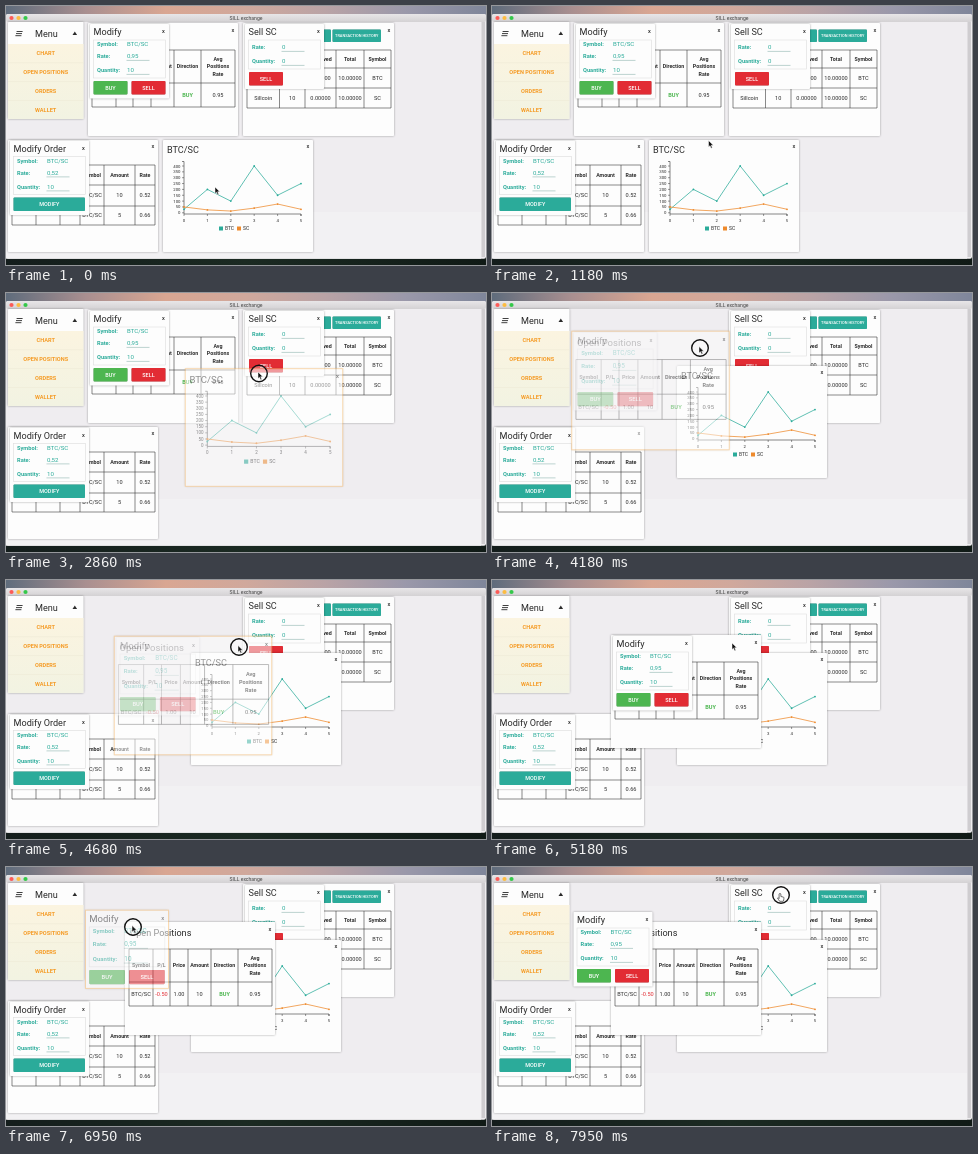
An HTML page that plays this animation: 480 px wide and 259 px high, repeating every 8 s.

```html
<!DOCTYPE html>
<html lang="en">
<head>
<meta charset="utf-8">
<title>Exchange dashboard</title>
<style>
html, body { margin: 0; width: 100%; height: 100%; overflow: hidden; background: #eee; }
svg { display: block; width: 100vw; height: 100vh; font-family: Roboto, "Open Sans", sans-serif; }
.card { fill: #fdfdfd; filter: drop-shadow(0 .7px 1px rgba(0,0,0,.35)); }
.btn { filter: drop-shadow(0 .6px .6px rgba(0,0,0,.35)); }
.grid { fill: none; stroke: #3c3c3c; stroke-width: .6; }
.edge { fill: none; stroke: #f7b765; stroke-width: .9; visibility: hidden; }
.drag > .edge { visibility: visible; }
.drag, .drag .nest { opacity: .52; }
</style>
</head>
<body>
<svg id="stage" viewBox="0 0 480 259"></svg>
<script>
const TEAL = '#2bab9a', ORANGE = '#f59a23', RED = '#e22c34', GREEN = '#4db650', INK = '#2b2b2b';
const stage = document.getElementById('stage');

// y is the vertical middle of the text
function text(x, y, s, size = 5.4, o = {}) {
  return `<text x="${x}" y="${y + size * .355}" font-size="${size}" fill="${o.fill || INK}"
    font-weight="${o.weight || 400}" text-anchor="${o.anchor || 'middle'}">${s}</text>`;
}
function rect(x, y, w, h, fill, extra = '') {
  return `<rect x="${x}" y="${y}" width="${w}" height="${h}" fill="${fill}" ${extra}/>`;
}
function line(d, color, width = .6) {
  return `<path d="${d}" fill="none" stroke="${color}" stroke-width="${width}"/>`;
}
function title(x, y, s) { return text(x, y, s, 9.1, { anchor: 'start' }); }
function close(x, y) { return text(x, y, 'x', 5.6, { weight: 500 }); }
function card(x, y, w, h) {
  return `<rect class="card" x="${x}" y="${y}" width="${w}" height="${h}" rx=".8"/>`;
}
function edge(x, y, w, h) {
  return `<rect class="edge" x="${x}" y="${y}" width="${w}" height="${h}"/>`;
}
function button(x, y, w, h, label, fill, size = 5.5) {
  return rect(x, y, w, h, fill, 'rx="1" class="btn"') +
    text(x + w / 2, y + h / 2, label, size, { fill: '#fff', weight: 500 });
}
function gradient(id, stops, vertical) {
  const dots = stops.map((c, i) => `<stop offset="${i / (stops.length - 1)}" stop-color="${c}"/>`).join('');
  return `<linearGradient id="${id}" ${vertical ? 'x2="0" y2="1"' : ''}>${dots}</linearGradient>`;
}

function table(cols, rows, cells) {
  const l = cols[0], r = cols[cols.length - 1], t = rows[0], b = rows[rows.length - 1];
  const d = cols.map(x => `M${x} ${t}V${b}`).join('') + rows.map(y => `M${l} ${y}H${r}`).join('');
  let out = `<path class="grid" d="${d}"/>`;
  cells.forEach((row, i) => row.forEach((cell, j) => {
    const x = (cols[j] + cols[j + 1]) / 2, y = (rows[i] + rows[i + 1]) / 2;
    const lines = cell.split('|');
    const fill = cell === 'BUY' ? GREEN : cell[0] === '-' ? RED : INK;
    const weight = i === 0 || cell === 'BUY' ? 700 : 400;
    lines.forEach((s, k) => {
      out += text(x, y + (k - (lines.length - 1) / 2) * 7.8, s, i ? 5.6 : 5.3, { fill, weight });
    });
  }));
  return out;
}

function form(x, y, h, name, fields, buttons) {
  const first = fields.length > 2 ? 20 : 23;
  const steps = fields.length > 2 ? [0, 12, 26] : [0, 14];
  const foot = first + steps[steps.length - 1] + 11;
  let out = card(x, y, 79, h) + title(x + 3.5, y + 8.2, name) + close(x + 73.5, y + 7.5) +
    rect(x + 3.5, y + 16, 72, foot - 19, 'none', 'stroke="#ddd" stroke-width=".6"');
  fields.forEach(([label, value], i) => {
    const fy = y + first + steps[i];
    out += text(x + 7, fy, label + ':', 5.7, { anchor: 'start', fill: TEAL, weight: 700 }) +
      text(x + 37, fy, value, 6.1, { anchor: 'start', fill: TEAL });
    if (label !== 'Symbol') out += line(`M${x + 36.5} ${fy + 4.4}h23`, '#8fb5b0', .6);
  });
  buttons.forEach(([label, fill, bx, w]) => { out += button(x + bx, y + foot, w, 13.5, label, fill); });
  return out;
}

function desktop() {
  return '<defs>' +
    gradient('sky', ['#5f6c7c', '#a98f90', '#d9a692', '#d0a89c', '#b9a3a6', '#9a98aa', '#7f869a']) +
    gradient('low', ['#141d1c', '#1b2a22', '#101a16']) +
    gradient('bar', ['#e8e6e8', '#d4d2d4'], true) +
    gradient('sand', ['#fbf4e0', '#f2f3e2'], true) + '</defs>' +
    rect(0, 0, 480, 20, 'url(#sky)') + rect(0, 240, 480, 19, 'url(#low)') +
    rect(0, 8, 480, 244.7, '#efedf0', 'rx="2"') + rect(0, 206, 475, 46.7, '#f2f1f3') +
    rect(0, 8, 480, 8, 'url(#bar)', 'rx="2"') + rect(475.5, 16, 3.5, 235, '#cfcdd0') +
    ['#fc5b57', '#fdbc40', '#35c84a'].map((c, i) => `<circle cx="${5.5 + 7 * i}" cy="12" r="2.1" fill="${c}"/>`).join('') +
    text(240, 12, 'SILL exchange', 5.1, { fill: '#444' });
}

function menu() {
  const items = ['CHART', 'OPEN POSITIONS', 'ORDERS', 'WALLET'];
  return card(2, 16, 75.5, 97) + rect(2, 38, 75.5, 75, 'url(#sand)') +
    line('M10.6 25.5h6M10 27.6h6M9.4 29.7h6', INK, .9) + title(29, 27.5, 'Menu') +
    `<path d="M66.5 29l2.3-3.6 2.3 3.6z" fill="${INK}"/>` +
    items.map((s, i) => text(39.7, 47.3 + 18.9 * i, s, 5.6, { fill: ORANGE, weight: 700 }) +
      (i ? line(`M2 ${38 + 18.8 * i}h75.5`, '#ebe6d2', .5) : '')).join('');
}

function orders() {
  return card(2, 134, 150, 112) + title(7, 146, 'Orders') + close(147, 140) +
    table([6, 30, 54, 74, 98, 129, 149], [159, 179, 200, 219], [
      ['Type', 'Status', 'ID', 'Symbol', 'Amount', 'Rate'],
      ['', '', '', 'BTC/SC', '10', '0.52'],
      ['', '', '', 'BTC/SC', '5', '0.66']]) +
    form(4, 134.5, 74.5, 'Modify Order', [['Symbol', 'BTC/SC'], ['Rate', '0,52'], ['Quantity', '10']],
      [['MODIFY', TEAL, 3.5, 71.5]]);
}

function wallet() {
  return card(237, 17, 151, 113) + close(383, 24.5) +
    button(290, 23.5, 35, 12.5, 'HISTORY', TEAL, 4) +
    button(326.5, 23.5, 48.5, 12.5, 'TRANSACTION HISTORY', TEAL, 3.9) +
    table([241, 273.5, 299, 330, 358, 385], [44, 62, 82, 102], [
      ['Name', 'Amount', 'Reserved', 'Total', 'Symbol'],
      ['Bitcoin', '10', '0.00000', '10.00000', 'BTC'],
      ['Sillcoin', '10', '0.00000', '10.00000', 'SC']]) +
    form(239, 18, 65, 'Sell SC', [['Rate', '0'], ['Quantity', '0']], [['SELL', RED, 4, 34]]);
}

function chart() {
  const px = i => 178 + 23.4 * i, py = v => 206.8 - v * .117;
  const plot = (vals, color) => line('M' + vals.map((v, i) => `${px(i)} ${py(v)}`).join('L'), color, .75) +
    vals.map((v, i) => `<circle cx="${px(i)}" cy="${py(v)}" r=".9" fill="${color}"/>`).join('');
  let out = card(157, 134, 150, 112) + title(161, 144, 'BTC/SC') + close(302, 140.5) +
    line('M176 155.5H178V208H295V210', '#333', .6);
  for (let v = 0; v <= 400; v += 50) {
    out += line(`M176 ${py(v)}h2`, '#333', .5) + text(174.5, py(v), v, 4.3, { anchor: 'end' });
  }
  for (let i = 0; i < 6; i++) out += line(`M${px(i)} 208v2`, '#333', .5) + text(px(i), 214, i, 4.3);
  return out + plot([30, 200, 100, 400, 150, 250], TEAL) + plot([50, 25, 15, 40, 75, 30], '#ee8a2c') +
    rect(213, 220.5, 4, 4, TEAL) + text(219, 222.5, 'BTC', 4.9, { anchor: 'start' }) +
    rect(231, 220.5, 4, 4, '#ee8a2c') + text(237, 222.5, 'SC', 4.9, { anchor: 'start' }) +
    edge(157, 134, 150, 112);
}

function positions() {
  return card(82, 17, 150, 113) + title(87, 27.6, 'Open Positions') + close(227, 24.5) +
    table([86, 110, 127, 145, 168, 195, 229], [44, 77, 101], [
      ['Symbol', 'P/L', 'Price', 'Amount', 'Direction', 'Avg|Positions|Rate'],
      ['BTC/SC', '-0.50', '1.00', '10', 'BUY', '0.95']]) +
    edge(82, 17, 150, 113) + '<g id="modify" class="nest">' +
    form(84, 18, 74.5, 'Modify', [['Symbol', 'BTC/SC'], ['Rate', '0,95'], ['Quantity', '10']],
      [['BUY', GREEN, 3.5, 34], ['SELL', RED, 41.5, 34]]) +
    edge(84, 18, 79, 74.5) + '</g>';
}

function pointer() {
  return `<g id="pointer">
    <circle id="ring" cx="1" cy="1.5" r="8.3" fill="#fff" fill-opacity=".25" stroke="#111" stroke-width="1.4"/>
    <path id="arrow" d="M0 0v6.6l1.5-1.4 1.1 2.5 1.2-.5-1.1-2.5h2.1z" fill="#111" stroke="#fff" stroke-width=".5"/>
    <path id="hand" d="M0 0c.9 0 .9.6.9 3l2.6.6c.6.2.5 2.5-.2 4.2h-3.6c-.6-1.3-1.7-2-2.2-3.2.5-.5 1.1-.2 1.6.4V.8c0-.6.4-.8.9-.8z" fill="#fff" stroke="#111" stroke-width=".6"/>
  </g>`;
}

stage.innerHTML = desktop() + menu() + orders() + wallet() +
  `<g id="chart">${chart()}</g><g id="positions">${positions()}</g>` + pointer();

const LOOP = 8000;
const path = [
  [0, 209, 181], [300, 209, 181], [1100, 216.5, 134.5], [1800, 216.5, 134.5], [2250, 227, 137],
  [2450, 227, 137], [2860, 252, 79], [3250, 255, 76], [3400, 255, 76], [3850, 203, 26], [3950, 203, 26],
  [4180, 207, 53.5], [4680, 232, 65.5], [4950, 240, 63], [5200, 240, 63], [6000, 165, 69.5],
  [6300, 165, 69.5], [6900, 126, 58.5], [7100, 126, 58.5], [7800, 288, 26.5], [LOOP, 288, 26.5]
];
const presses = [[2300, 3330], [3880, 5000], [6120, 6980], [7820, LOOP]];
const drags = [
  { id: 'chart', cx: 232, cy: 190, from: 2400, to: 3330, path: [[2450, 0, 0], [2860, 26, -55.5], [3250, 28, -61]] },
  { id: 'positions', cx: 157, cy: 73.5, from: 3930, to: 5000, path: [[3950, 0, 0], [4180, 1.5, 24], [4680, 30, 42], [4950, 37, 38]] },
  { id: 'modify', cx: 123.5, cy: 55, from: 6280, to: 6980, path: [[6300, 0, 0], [6900, -39.5, -11]] }
];
const el = id => document.getElementById(id);
const show = (id, on) => el(id).setAttribute('visibility', on ? 'visible' : 'hidden');

function at(keys, t) {
  if (t <= keys[0][0]) return keys[0].slice(1);
  for (let i = 1; i < keys.length; i++) {
    const [t0, x0, y0] = keys[i - 1], [t1, x1, y1] = keys[i];
    if (t < t1) {
      const u = (t - t0) / (t1 - t0), k = u * u * (3 - 2 * u);
      return [x0 + (x1 - x0) * k, y0 + (y1 - y0) * k];
    }
  }
  return keys[keys.length - 1].slice(1);
}

// the card being dragged, or dragged last, lies on top
function raise(id) {
  const node = el(id), pointer = el('pointer');
  if (node.nextElementSibling !== pointer) stage.insertBefore(node, pointer);
}

function draw(t) {
  raise(t < drags[1].from ? 'chart' : 'positions');
  for (const d of drags) {
    const [x, y] = at(d.path, t);
    const held = t >= d.from && t < d.to, node = el(d.id);
    node.classList.toggle('drag', held);
    node.setAttribute('transform', `translate(${x + d.cx} ${y + d.cy}) scale(${held ? 1.05 : 1}) translate(${-d.cx} ${-d.cy})`);
  }
  const [px, py] = at(path, t);
  el('pointer').setAttribute('transform', `translate(${px} ${py})`);
  show('ring', presses.some(([a, b]) => t >= a && t < b));
  show('hand', t > 7650);
  show('arrow', t <= 7650);
}

const start = performance.now();
function tick() {
  draw((performance.now() - start) % LOOP);
  requestAnimationFrame(tick);
}
tick();
</script>
</body>
</html>
```
